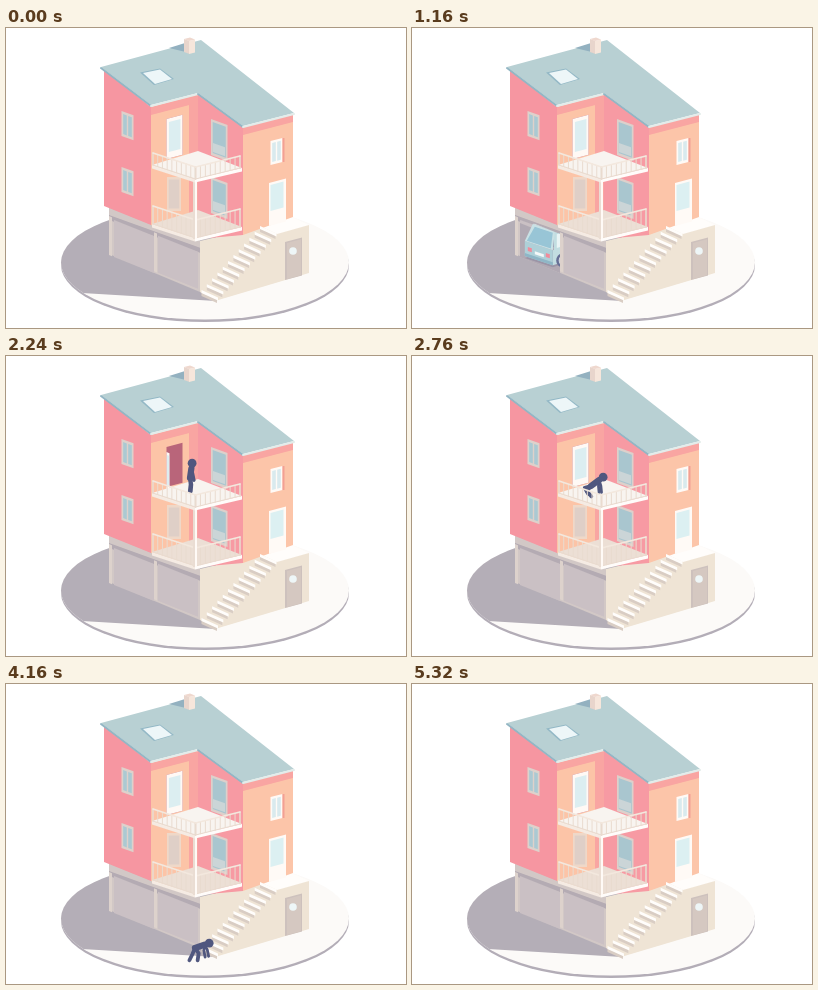
These frames come from a looping animation (400x300 px, 6.32 s). An HTML page with a canvas:

```html
<!DOCTYPE html>
<html lang="en">
<head>
<meta charset="utf-8">
<title>Isometric house</title>
<style>
html, body { margin: 0; width: 100%; height: 100%; overflow: hidden; background: #fff; }
canvas { display: block; width: 400px; height: 300px; }
</style>
</head>
<body>
<canvas id="stage"></canvas>
<script>
const LOOP = 6320, STEP = 40;
const UP = -.26, DOWN = .36; // slopes of the two wall directions
const canvas = document.getElementById('stage');
const ratio = window.devicePixelRatio || 1;
canvas.width = 400 * ratio;
canvas.height = 300 * ratio;
const g = canvas.getContext('2d');
g.scale(ratio, ratio);
g.lineCap = g.lineJoin = 'round';

const mix = (a, b, k) => a + (b - a) * k;
const ramp = (t, a, b) => Math.max(0, Math.min(1, (t - a) / (b - a)));
const ease = k => k * k * (3 - 2 * k);

function path(p) {
  g.beginPath();
  for (let i = 0; i < p.length; i += 2) g.lineTo(p[i], p[i + 1]);
}
function poly(color, ...p) { path(p); g.fillStyle = color; g.fill(); }
function line(color, width, ...p) {
  path(p);
  g.strokeStyle = color;
  g.lineWidth = width;
  g.stroke();
}
function oval(color, x, y, rx, ry = rx) {
  g.beginPath();
  g.ellipse(x, y, rx, ry, 0, 0, 7);
  g.fillStyle = color;
  g.fill();
}
// Upright parallelogram from its top left corner
function panel(color, x, y, w, h, slope) {
  const end = y + w * slope;
  poly(color, x, y, x + w, end, x + w, end + h, x, y + h);
}
function framed(x, y, w, h, slope, frame, glass, panes = 1) {
  panel(frame, x, y, w, h, slope);
  const part = (w - 2) / panes;
  for (let i = 0; i < panes; i++) {
    const dx = 1.7 + i * part;
    panel(glass, x + dx, y + 2.5 + dx * slope, part - 1.4, h - 5, slope);
  }
}

function ground() {
  oval('#b3adb7', 199, 237, 144, 57);
  oval('#fcfaf8', 199, 234.5, 144, 57);
  g.save();
  g.clip();
  poly('#b4aeb7', 50, 263.5, 76, 265, 210, 273, 210, 170, 50, 170);
  g.restore();
}

function base() {
  poly('#d2c8c6', 103, 178, 194, 212, 194, 264, 103, 226);
  panel('#b4abb3', 103, 187, 91, 5, DOWN);
  for (const x of [108, 152]) panel('#cac0c4', x, 192 + (x - 108) * DOWN, 40, 37, .4);
  for (const x of [103, 148]) panel('#ddd2cc', x, 188 + (x - 103) * DOWN, 3, 39, .4);
  poly('#efe4d5', 194, 213, 262, 197, 303, 197, 303, 245, 209, 273, 194, 264);
  poly('#fffdfb', 256, 199, 284, 188, 303, 197, 271, 206);
  panel('#cdc1bd', 279, 214, 17, 38, UP);
  panel('#d5c8c1', 281, 215, 14, 36, UP);
  oval('#eef6f7', 287, 223, 3.8);
}

function stairs() {
  const steps = 12;
  for (let i = 0; i < steps; i++) {
    const x = mix(254, 195.5, i / (steps - 1)), y = mix(198, 262, i / (steps - 1));
    panel('#d9cdc4', x, y + 2.5, 15.5, 3.5, .45);
    panel('#fffdfb', x, y, 16.5, 3, .45);
  }
}

// Wall corners: x, eaves, foot
const corners = [[98, 42, 178], [145, 79, 197], [192, 66, 211], [237, 99, 207], [287, 87, 189]];
const wallColors = ['#f696a1', '#fcc4a7', '#f79aa3', '#fcc5a9'];

function walls() {
  wallColors.forEach((color, i) => {
    const [x1, y1, foot1] = corners[i], [x2, y2, foot2] = corners[i + 1];
    poly(color, x1, y1, x2, y2, x2, foot2, x1, foot1);
    if (i % 2) panel('#f9a5a2', x1, y1, x2 - x1, 8, UP);
  });
  panel('#f9a5a2', 183, 70, 9, 130, UP);
  for (const y of [83, 139]) framed(115.5, y, 12, 25, DOWN, '#ded1cb', '#abc9d2', 2);
  framed(264.5, 113, 12, 24, UP, '#fffaf6', '#d9eaee', 2);
  panel('#f3a094', 276.5, 110, 2, 24, 0);
  panel('#fffaf6', 263, 155, 17, 43, UP);
  panel('#dcf0f2', 264.5, 157, 13, 26, UP);
  for (const y of [91, 149]) {
    framed(205, y, 16.5, 36, DOWN, '#ddd0cb', '#a9c6cf');
    panel('#cbd5d7', 207, y + 24, 12, 9, DOWN);
  }
  framed(161, 149, 14, 34, 0, '#efd8c8', '#dfcfc7');
}

function balconyDoor(t) {
  const open = ease(ramp(t, 1680, 1960)) * (1 - ease(ramp(t, 2340, 2600)));
  const w = mix(16, 3, open), slope = mix(UP, .4, open);
  panel('#b9657a', 160.5, 91, 16, 40, UP);
  panel('#fff9f5', 160.5, 91 + open * 5, w, 40, slope);
  panel('#dceef1', 160.5 + w * .15, 94 + open * 5, w * .72, 30, slope);
}

function roof() {
  const eaves = [95, 39, 145, 77, 192, 65, 237, 98, 288, 85];
  poly('#b8d0d3', ...eaves, 195, 12);
  for (let i = 0; i < 4; i++)
    line(i % 2 ? '#e3ecea' : '#93b6c4', 2, ...eaves.slice(i * 2, i * 2 + 4).map((v, j) => v + j % 2));
  poly('#93b1c0', 163, 20, 179, 15, 184, 25);
  panel('#e8d5cc', 178, 11, 5, 13, DOWN);
  panel('#f6e6db', 183, 13, 6, 13, UP);
  poly('#efd8ce', 178, 11, 184, 9.5, 189, 11.5, 183, 13);
  poly('#93b8c6', 134, 44.5, 154, 40.5, 168, 51, 148, 57);
  poly('#edf6f8', 137, 45, 154, 41.5, 166, 51, 149, 56);
}

function floorSlab(y, color) {
  poly(color, 146, y, 192, y - 14, 236, y + 3, 189, y + 14);
  panel('#f5ebe3', 146, y, 43, 3.5, 14 / 43);
  panel('#fffcfa', 189, y + 14, 47, 3.5, -11 / 47);
}
function rail(x1, y1, x2, y2, h) {
  const color = '#e9dbcf', n = 9;
  for (let i = 0; i <= n; i++) {
    const x = mix(x1, x2, i / n), y = mix(y1, y2, i / n);
    line(color, i % n ? 1 : 1.6, x, y, x, y + h);
  }
  line(color, 1, x1, y1 + h, x2, y2 + h);
  line('#f3e8de', 1.7, x1, y1, x2, y2);
}
function railings(y, h) {
  rail(147, y - h, 189.5, y + 14 - h, h);
  rail(189.5, y + 14 - h, 234, y + 3 - h, h);
}

function garage(t) {
  const open = ease(ramp(t, 400, 640)) * (1 - ease(ramp(t, 1440, 1740)));
  if (!open) return;
  g.save();
  path([108, 192, 148, 206, 148, 245, 108, 229]);
  g.clip();
  g.fillStyle = '#b1a9b3';
  g.fillRect(100, 180, 50, 70);
  poly('#8b85a0', 124, 211, 148, 205, 148, 222);
  panel('#cac0c4', 108, 192 - 34 * open, 40, 37, .4);
  g.restore();
}

// Car axes: u forward, v across, z up
const spot = (u, v, z) => [85 + u - v, 254 - u * .32 - v * .33 - z];
const shape = (color, ...points) => poly(color, ...points.flatMap(p => spot(...p)));
// Rectangle on the tail, or on the side when v is fixed
const tail = (color, v1, v2, z1, z2) => shape(color, [0, v1, z1], [0, v2, z1], [0, v2, z2], [0, v1, z2]);
const side = (color, u1, u2, z1, z2) => shape(color, [u1, 0, z1], [u2, 0, z1], [u2 - 3, 1, z2], [u1 + 1, 1, z2]);

function car(t) {
  if (t < 600 || t > 1460) return;
  const dx = (t - 800) * .155;
  g.save();
  path([0, 150, 108, 190, 148, 206, 148, 300, 0, 300]);
  g.clip();
  g.globalAlpha = ramp(t, 590, 700);
  g.translate(dx, -dx * .3);
  shape('#9b94a6', [0, 0, -2], [50, 0, -2], [50, 26, -2], [0, 28, -2]);
  shape('#d9eaec', [30, 0, 14], [50, 0, 10], [50, 26, 10], [30, 26, 14]);
  shape('#c2dde1', [0, 0, 0], [50, 0, 0], [50, 0, 10], [30, 0, 14], [0, 0, 15]);
  side('#c2dde1', 1, 34, 13, 32);
  side('#e9f4f5', 4, 15, 16, 29);
  side('#e9f4f5', 17, 30, 16, 29);
  tail('#aed0d8', 0, 28, 0, 15);
  shape('#c9e1e5', [0, 0, 15], [0, 28, 15], [4, 24, 32], [4, 2, 32]);
  shape('#98c5d6', [0, 2, 16], [0, 26, 16], [4, 22, 30], [4, 4, 30]);
  shape('#d9eaec', [4, 2, 32], [4, 24, 32], [27, 24, 32], [27, 2, 32]);
  tail('#8fb6c6', 0, 28, 0, 3);
  for (const v of [3, 21]) tail('#f08b9b', v, v + 4, 6, 10);
  tail('#f4f8f8', 9, 18, 5, 8);
  for (const u of [9, 41]) {
    const [x, y] = spot(u, 0, 2);
    oval('#666f95', x, y, 5.6, 6.6);
    oval('#cdd3dc', x + .4, y, 3.5, 4.3);
  }
  g.restore();
}

// Angles from straight down: torso, arms, arm spread, thighs, leg spread, shins
const climb = [2.2, .1, .2, -1, .3, .6];
const hang = [3.1, 3.1, .4, .3, .9, -.1];
const crouch = [1.9, .2, .3, .1, .5, -.3];
function walk(t) {
  const swing = Math.sin(t / 65);
  return [3, .2, -.6 * swing, .15, .6 * swing, -.1];
}

// Time, hip position, pose (none means walking)
const moves = [
  [1880, 168, 113], [2240, 184, 122], [2480, 184, 122], [2720, 179, 130, climb],
  [2840, 179, 130, climb], [3080, 190, 163, hang], [3320, 190, 165, hang],
  [3560, 190, 187, hang], [3960, 191, 262, hang], [4120, 189, 264, crouch],
  [4200, 189, 264, crouch], [4440, 196, 266], [4840, 226, 274], [5320, 275, 287]
];

const reach = ([x, y], angle, length) => [x + Math.sin(angle) * length, y + Math.cos(angle) * length];

function person(t) {
  const i = moves.findIndex(m => m[0] > t);
  if (i < 1) return;
  const a = moves[i - 1], b = moves[i], k = ramp(t, a[0], b[0]);
  const from = a[3] || walk(t), to = b[3] || walk(t);
  const [torso, arm, armGap, thigh, legGap, shin] = from.map((v, j) => mix(v, to[j], ease(k)));
  const hip = [mix(a[1], b[1], k), mix(a[2], b[2], k)];
  const neck = reach(hip, torso, 10), head = reach(neck, torso, 5);
  const ink = '#50577f';
  g.save();
  g.globalAlpha = ramp(t, 1860, 1960) * (1 - ramp(t, 5160, 5320));
  for (const s of [-1, 1]) {
    const knee = reach(hip, thigh + s * legGap, 6.5);
    line(ink, 3.8, ...hip, ...knee, ...reach(knee, shin + s * legGap * .3, 7));
    const elbow = reach(neck, arm + s * armGap, 6);
    line(ink, 2.8, ...neck, ...elbow, ...reach(elbow, arm, 6.5));
  }
  line(ink, 6.2, ...hip, ...neck);
  oval(ink, ...head, 4.4);
  g.restore();
}

function draw(t) {
  g.fillStyle = '#fff';
  g.fillRect(0, 0, 400, 300);
  ground();
  base();
  garage(t);
  walls();
  balconyDoor(t);
  stairs();
  roof();
  floorSlab(196, '#ecdfd5');
  railings(196, 18);
  panel('#eaddd3', 187, 152, 2, 59, 0);
  panel('#fffaf6', 189, 152, 2, 59, 0);
  floorSlab(137, '#f8f4f0');
  if (t < 2840) person(t);
  railings(137, 12);
  car(t);
  if (t >= 2840) person(t);
}

const start = performance.now();
function tick() {
  const t = (performance.now() - start) % LOOP;
  draw(Math.floor(t / STEP) * STEP);
  requestAnimationFrame(tick);
}
tick();
</script>
</body>
</html>
```
